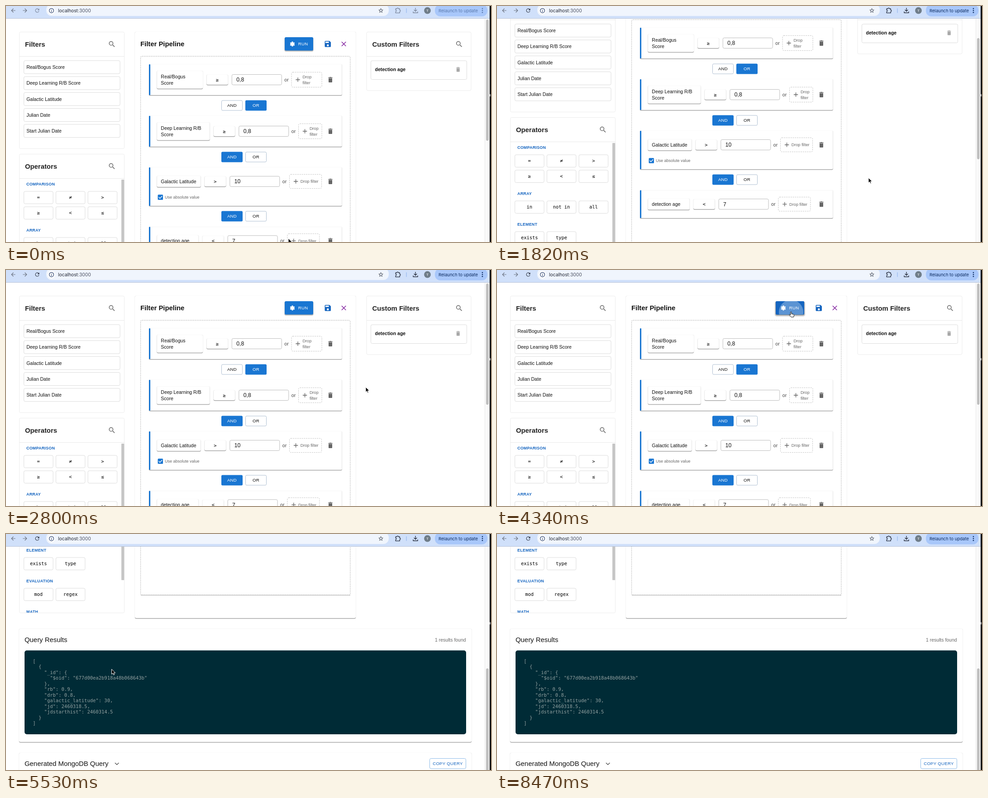
These frames come from a looping animation (1072 px wide and 522 px high, 9030 ms). An HTML page:

```html
<!DOCTYPE html>
<html lang="en">
<head>
<meta charset="utf-8">
<title>Filter Pipeline</title>
<style>
  html, body { margin: 0; width: 100%; height: 100%; overflow: hidden; background: #fff; }
  svg { display: block; width: 1072px; height: 522px; }
  text { font-family: "Liberation Sans", Arial, sans-serif; white-space: pre; }
  .mono { font-family: "DejaVu Sans Mono", Menlo, monospace; }
  .ui { font-family: Inter, Roboto, sans-serif; }
  .caps { letter-spacing: .28px; }
  .drop { fill: none; stroke: #c4c4c4; stroke-dasharray: 3 1.8; }
  .card.on { transform: translateX(1px); }
  .card.on .drop { stroke: #8c8c8c; }
  .card .lift { opacity: 0; }
  .card.on .lift { opacity: 1; }
  .line { fill: none; stroke-linecap: round; stroke-linejoin: round; }
</style>
</head>
<body>
<svg id="stage" viewBox="0 0 1072 522" xmlns="http://www.w3.org/2000/svg"></svg>
<script>
const LOOP = 9030, STEP = 70;
const BLUE = '#1976d2', DARK_BLUE = '#1565c0', INK = '#111', GREY = '#666';

const ICONS = {
  search: 'M15.5 14h-.79l-.28-.27A6.47 6.47 0 0 0 16 9.5 6.5 6.5 0 1 0 9.5 16c1.61 0 3.09-.59 4.23-1.57l.27.28v.79l5 4.99L20.49 19zm-6 0a4.5 4.5 0 1 1 0-9 4.5 4.5 0 0 1 0 9z',
  trash: 'M6 19c0 1.1.9 2 2 2h8c1.1 0 2-.9 2-2V7H6zM19 4h-3.5l-1-1h-5l-1 1H5v2h14z',
  plus: 'M19 13h-6v6h-2v-6H5v-2h6V5h2v6h6z',
  save: 'M17 3H5a2 2 0 0 0-2 2v14c0 1.1.9 2 2 2h14c1.1 0 2-.9 2-2V7zm-5 16a3 3 0 1 1 0-6 3 3 0 0 1 0 6zm3-10H5V5h10z',
  close: 'M19 6.4 17.6 5 12 10.6 6.4 5 5 6.4l5.6 5.6L5 17.6 6.4 19l5.6-5.6 5.6 5.6 1.4-1.4-5.6-5.6z',
  back: 'M20 11H7.8l5.6-5.6L12 4l-8 8 8 8 1.4-1.4L7.8 13H20z',
  forward: 'M4 11h12.2l-5.6-5.6L12 4l8 8-8 8-1.4-1.4 5.6-5.6H4z',
  reload: 'M17.65 6.35A8 8 0 1 0 19.73 14h-2.08A6 6 0 1 1 12 6c1.66 0 3.14.69 4.22 1.78L13 11h7V4z',
  star: 'M22 9.24l-7.19-.62L12 2 9.19 8.63 2 9.24l5.46 4.73L5.82 21 12 17.27 18.18 21l-1.63-7.03zM12 15.4l-3.76 2.27 1-4.28-3.32-2.88 4.38-.38L12 6.1l1.71 4.04 4.38.38-3.32 2.88 1 4.28z'
};

const rect = (x, y, w, h, r = 0, attrs = '') =>
  `<rect x="${x}" y="${y}" width="${w}" height="${h}" rx="${r}" ${attrs}/>`;
const fillRect = (x, y, w, h, r, color) => rect(x, y, w, h, r, `fill="${color}"`);
const outline = (x, y, w, h, r, color) => rect(x, y, w, h, r, `fill="#fff" stroke="${color}"`);
// y is the middle of the capitals
const text = (x, y, str, size, fill = INK, attrs = '') =>
  `<text x="${x}" y="${y + size * .36}" font-size="${size}" fill="${fill}" ${attrs}>${str.replace(/</g, '&lt;')}</text>`;
const middle = (x, y, str, size, fill, attrs = '') => text(x, y, str, size, fill, `text-anchor="middle" ${attrs}`);
const bold = 'font-weight="700"';
const icon = (name, x, y, size, fill) =>
  `<path d="${ICONS[name]}" fill="${fill}" transform="translate(${x - size / 2} ${y - size / 2}) scale(${size / 24})"/>`;
const stroke = (d, color, width = 1.2) => `<path class="line" d="${d}" stroke="${color}" stroke-width="${width}"/>`;
const paper = (x, y, w, h, r = 3) =>
  rect(x - .6, y - .2, w + 1.2, h + 1.6, r, 'fill="#000" opacity=".09"') +
  rect(x, y + .6, w, h + .9, r, 'fill="#000" opacity=".28"') +
  fillRect(x, y, w, h, r, '#fff');

function sidePanel(x, y, w, h, title) {
  return outline(x, y, w, h, 3, '#ececec') + text(x + 12.5, y + 27, title, 14.85, '#222', bold) +
    icon('search', x + 204.7, y + 27, 18, GREY) + fillRect(x, y + 53.5, w, 1, 0, '#e8e8e8');
}

function filters() {
  const names = ['Real/Bogus Score', 'Deep Learning R/B Score', 'Galactic Latitude', 'Julian Date', 'Start Julian Date'];
  return sidePanel(29.5, 57.5, 232, 258, 'Filters') + names.map((name, i) => {
    const y = 120.8 + i * 35.25;
    return outline(39.5, y, 212.5, 29, 3, '#dcdcdc') + text(45.2, y + 14.5, name, 10.5);
  }).join('');
}

function operators() {
  const groups = [
    ['COMPARISON', 394, ['=', '≠', '>', '≥', '<', '≤']],
    ['ARRAY', 496, ['in', 'not in', 'all']],
    ['ELEMENT', 564, ['exists', 'type']],
    ['EVALUATION', 632, ['mod', 'regex']],
    ['MATH', 700, []]
  ];
  const body = groups.map(([label, y, ops]) =>
    text(45, y, label, 8.9, DARK_BLUE, bold + ' style="letter-spacing:.26px"') + ops.map((op, i) => {
      const x = 39.5 + (i % 3) * 70.8, top = y + 16 + Math.floor(i / 3) * 34;
      return outline(x, top, 64.5, 27.5, 3, '#dcdcdc') + middle(x + 32.2, top + 13.7, op, 10.4, '#000', 'class="mono"');
    }).join('')).join('');
  return sidePanel(29.5, 327.5, 232, 375, 'Operators') +
    `<g clip-path="url(#ops)">${body}</g>` + fillRect(255, 384, 6.2, 246, 1, '#c6c6c6');
}

function customFilters() {
  return sidePanel(797, 57.5, 231, 129.5, 'Custom Filters') + outline(806.5, 121, 212, 41.5, 3, '#dcdcdc') +
    text(815.5, 140.5, 'detection age', 10.5, INK, bold) + icon('trash', 999.3, 140.3, 14, '#a8a8a8');
}

const CARDS = [
  { top: 129, bottom: 197, mid: 163, name: ['Real/Bogus', 'Score'], chip: 101.5, op: '≥', value: '0,8', drop: 67, split: true },
  { top: 243, bottom: 311, mid: 277, name: ['Deep Learning R/B', 'Score'], chip: 117, op: '≥', value: '0,8', drop: 51.5, split: true },
  { top: 357, bottom: 442, mid: 388, name: ['Galactic Latitude'], chip: 97, op: '>', value: '10', drop: 71, absolute: true },
  { top: 488.5, bottom: 550, mid: 519.3, name: ['detection age'], chip: 92.3, op: '<', value: '7', drop: 71 }
];

function card(c) {
  const { mid } = c, two = c.name.length > 1, half = two ? 19.7 : 12.3;
  const opX = 333.5 + c.chip + 8.3, inX = opX + 56, orX = inX + 116, dropX = orX + 15.8;
  const dropHalf = c.split ? 16.6 : 15.6;
  const plusX = dropX + 14;
  let out = paper(316, c.top, 426.5, c.bottom - c.top, 2) +
    rect(317, c.top, 425.5, c.bottom - c.top, 2, 'class="lift" fill="none" stroke="#ddd"') +
    fillRect(316, c.top, 3, c.bottom - c.top, 1, BLUE) +
    paper(333.5, mid - half, c.chip, half * 2) +
    c.name.map((n, i) => text(342.3, mid + (two ? -7 + i * 14.5 : 0), n, 10.5)).join('') +
    paper(opX, mid - 11, 47.5, 22) + middle(opX + 23.7, mid, c.op, 10.4, '#000', 'class="mono"') +
    outline(inX, mid - 11.5, 110, 23, 3, '#bdbdbd') + text(inX + 10, mid, c.value, 12.2) +
    text(orX, mid, 'or', 10.5, '#444') +
    rect(dropX, mid - dropHalf, c.drop, dropHalf * 2, 3, 'class="drop"') + icon('plus', plusX, mid, 16, GREY) +
    (c.split ? text(plusX + 10.3, mid - 6.2, 'Drop', 9.2, GREY) + text(plusX + 10.3, mid + 6.2, 'filter', 9.2, GREY)
             : text(plusX + 10.2, mid, 'Drop filter', 9.2, GREY)) +
    icon('trash', 717, mid, 16, GREY);
  if (c.absolute) {
    out += fillRect(335.5, 417.3, 11.5, 11.5, 1.5, BLUE) + stroke('M338 423.2l2.3 2.4 4.4-4.8', '#fff', 1.4) +
      text(351, 423, 'Use absolute value', 9, GREY);
  }
  return `<g class="card">${out}</g>`;
}

function toggle(mid, chosen) {
  return ['AND', 'OR'].map((label, i) => {
    const x = 476.5 + i * 53, on = label === chosen;
    return (on ? fillRect(x - .5, mid - 11.5, 47, 23, 2.5, BLUE) : outline(x, mid - 11, 46, 22, 2.5, '#aebfd2')) +
      middle(x + 23, mid, label, 9.6, on ? '#fff' : INK, 'class="caps"');
  }).join('');
}

function pipeline() {
  const teeth = Array.from({ length: 6 }, (_, i) =>
    rect(631.6, 78.6, 2.8, 11, .6, `fill="#fff" transform="rotate(${i * 30} 633 84.1)"`)).filter((_, i) => i % 2 === 0).join('');
  return paper(285, 57, 488, 657) + text(297, 84, 'Filter Pipeline', 14.85, INK, bold) +
    rect(615.5, 69.5, 64, 31, 3, 'fill="#000" opacity=".3"') +
    rect(613.5, 69, 68, 34, 5, 'id="glow" fill="#000"') +
    fillRect(616, 69, 63, 29.5, 3, BLUE) + rect(616, 69, 63, 29.5, 3, `id="hover" fill="${DARK_BLUE}"`) +
    `<circle id="ripple" cx="650" cy="93" fill="#fff" clip-path="url(#run)"/>` +
    teeth + `<circle cx="633" cy="84.1" r="3" fill="none" stroke="#fff" stroke-width="2.4"/>` +
    text(645.8, 84, 'RUN', 9.6, '#fff', 'class="caps"') +
    icon('save', 711.3, 84, 18, DARK_BLUE) + icon('close', 746.6, 84, 18, '#8324a0') +
    fillRect(298, 662.6, 463, 1.4, 0, '#b5b5b5') +
    rect(297.5, 111.3, 463.3, 551.5, 3, 'fill="#fff" stroke="#c8c8c8" stroke-width="1.4" stroke-dasharray="2.4 1.5"') +
    CARDS.map(card).join('') + toggle(220, 'OR') + toggle(334, 'AND') + toggle(465, 'AND');
}

function results() {
  const json = JSON.stringify([{
    _id: { $oid: '677d00ea2b918a48b068643b' },
    rb: 0.9, drb: 0.8, galactic_latitude: 30, jd: 2460318.5, jdstarthist: 2460314.5
  }], null, 2).split('\n');
  return paper(29, 737.5, 1000, 250.5) + text(41, 762, 'Query Results', 14.9) +
    text(1016.5, 762, '1 results found', 10.45, GREY, 'text-anchor="end"') +
    fillRect(41, 785.5, 976, 185.5, 5, '#002b36') +
    json.map((row, i) => text(59.3, 808.8 + i * 12.52, row, 10.5, '#93a1a1', 'class="mono" xml:space="preserve"')).join('') +
    paper(29, 1012, 1000, 90) + text(41, 1036, 'Generated MongoDB Query', 14.9) +
    stroke('M241.3 1034.5l3.8 3.8 3.8-3.8', '#555', 1.4) +
    outline(936.5, 1024.5, 80, 22.5, 3, '#8cbae8') + middle(976.4, 1035.8, 'COPY QUERY', 9.6, DARK_BLUE, 'class="caps"');
}

function toolbar() {
  const ink = '#2b3140';
  return fillRect(0, 0, 1072, 27, 0, '#d0e0fa') + fillRect(0, 27, 1072, 1, 0, '#b7c3d8') +
    icon('back', 16, 10, 14, '#6b7280') + icon('forward', 42, 10, 14, '#6b7280') +
    fillRect(89, -4, 757, 26, 12, '#f0f5fd') +
    `<circle cx="100.5" cy="10.2" r="8.2" fill="#fff"/><circle cx="100.5" cy="10.2" r="4.9" fill="none" stroke="#2a416f" stroke-width="1.2"/>` +
    stroke('M100.5 10v2.4M100.5 7.9v.1', '#2a416f', 1.2) +
    `<text class="ui" x="115" y="14" font-size="10.3" fill="#1f2430">localhost<tspan fill="#4a5060">:3000</tspan></text>` +
    icon('star', 828.6, 10, 13, '#3d4350') +
    fillRect(884.4, 5, 1.4, 10.5, .7, '#9dbdf0') +
    `<circle cx="931.5" cy="10" r="7.4" fill="#6f7d89"/>` + middle(931.5, 10.1, 'T', 8, '#fff') +
    fillRect(948, -3, 116, 26, 12, '#a8c7fa') +
    `<g id="active">` + icon('reload', 69, 10, 13.5, ink) +
    stroke('M861.2 6h2.8a1.6 1.6 0 0 1 3.4 0h2.8v3a1.6 1.6 0 0 1 0 3.4v3h-9v-3a1.7 1.7 0 0 0 0-3.4z', ink, 1.3) +
    stroke('M905 4.6v7M902 8.8l3 3 3-3M900 12.6v2.4h10v-2.4', ink, 1.4) +
    `<text class="ui" x="956" y="13.8" font-size="9.55" fill="#0b2a5f">Relaunch to update</text>` +
    [5.8, 10, 14.2].map(y => `<circle cx="1053" cy="${y}" r="1.3" fill="#0b2a5f"/>`).join('') + `</g>`;
}

const stage = document.getElementById('stage');
stage.innerHTML = `<defs>
    <clipPath id="ops">${rect(30, 382, 231, 320)}</clipPath>
    <clipPath id="run">${rect(616, 69, 63, 29.5, 3)}</clipPath>
  </defs>` +
  fillRect(0, 0, 1072, 522, 0, '#fff') +
  `<g id="page">${filters()}${operators()}${customFilters()}${pipeline()}${results()}</g>` +
  fillRect(1058, 28, 11, 494, 0, '#fafafa') + fillRect(1058, 28, 1, 494, 0, '#e8e8e8') +
  rect(1061, 0, 6, 268, 3, 'id="thumb" fill="#c1c1c1"') + toolbar() +
  fillRect(1069, 0, 3, 522, 0, '#0c0c0e') + fillRect(1069, 195, 2, 5, 0, '#999') +
  `<path id="arrow" d="M0 0v11.2l2.6-2.4 1.8 4 1.9-.8-1.8-3.9h3.7z" fill="#000" stroke="#fff" stroke-width="1" stroke-linejoin="round"/>
   <path id="hand" d="M-1.2 1a1.1 1.1 0 0 1 2.2 0v3.4l4.2 1c1 .3 1.5 1 1.3 2l-.8 4.1h-5.6l-4-4.3c-.6-.9.5-1.8 1.4-1.1l1.3 1z" fill="#fff" stroke="#111" stroke-width="1" stroke-linejoin="round"/>`;

const el = id => document.getElementById(id);
const cardNodes = [...stage.querySelectorAll('.card')];
const clamp = v => Math.max(0, Math.min(1, v));

// Monotone cubic through [time, value...] keys
function track(keys, t, ch = 1) {
  const last = keys.length - 1;
  if (t <= keys[0][0]) return keys[0][ch];
  if (t >= keys[last][0]) return keys[last][ch];
  const i = keys.findIndex(k => k[0] > t) - 1;
  const slope = j => (keys[j + 1][ch] - keys[j][ch]) / (keys[j + 1][0] - keys[j][0]);
  const tangent = j => {
    if (j === 0 || j === last) return 0;
    const a = slope(j - 1), b = slope(j);
    return a * b <= 0 ? 0 : 2 * a * b / (a + b);
  };
  const span = keys[i + 1][0] - keys[i][0], u = (t - keys[i][0]) / span, v = 1 - u;
  return keys[i][ch] * v * v * (1 + 2 * u) + keys[i + 1][ch] * u * u * (3 - 2 * u) +
    span * u * v * (tangent(i) * v - tangent(i + 1) * u);
}

const SCROLL = [[1290, 0], [1540, 50], [1820, 81], [2120, 84], [2200, 83], [2620, 0], [4380, 0], [4970, 528]];
const POINTER = [
  [70, 624, 514], [880, 821, 381], [1120, 821, 380], [2450, 821, 380], [2800, 795, 259], [3130, 650, 92],
  [3780, 650, 92], [3850, 650, 92.6], [5050, 650, 92.6], [5550, 220, 300], [5880, 60, 285], [6150, 51, 430],
  [6430, 320, 436], [6720, 586, 240], [7000, 971, 326], [7280, 1030, 194], [7480, 1036, 437],
  [7640, 1044, 300], [8020, 900, 226], [8400, 540, 510], [8470, 537, 526]
];

function draw(t) {
  const scroll = track(SCROLL, t), x = track(POINTER, t, 1), y = track(POINTER, t, 2), pageY = y + scroll;
  el('page').setAttribute('transform', `translate(0 ${-scroll})`);
  el('thumb').setAttribute('y', 30 + scroll * .506);
  el('active').setAttribute('opacity', t < 140 ? .5 : 1);

  const focused = t > 1000;
  cardNodes.forEach((node, i) => node.classList.toggle('on',
    focused && x > 316 && x < 743 && pageY > CARDS[i].top && pageY < CARDS[i].bottom));

  const onRun = x > 616 && x < 679 && pageY > 69 && pageY < 98.5;
  const hover = clamp((t - 3130) / 250) * clamp((4700 - t) / 250);
  el('hover').setAttribute('opacity', hover);
  el('glow').setAttribute('opacity', hover * .14);
  const grow = clamp((t - 4100) / 550);
  el('ripple').setAttribute('r', 42 * (1 - (1 - grow) ** 1.8));
  el('ripple').setAttribute('opacity', .3 * clamp((4900 - t) / 500));

  for (const [id, shown] of [['arrow', !onRun], ['hand', onRun]]) {
    el(id).setAttribute('transform', `translate(${x} ${y})`);
    el(id).setAttribute('visibility', shown ? 'visible' : 'hidden');
  }
}

let start;
function tick(now) {
  start ??= now;
  draw(Math.floor((now - start) % LOOP / STEP) * STEP);
  requestAnimationFrame(tick);
}
draw(0);
requestAnimationFrame(tick);
</script>
</body>
</html>
```
